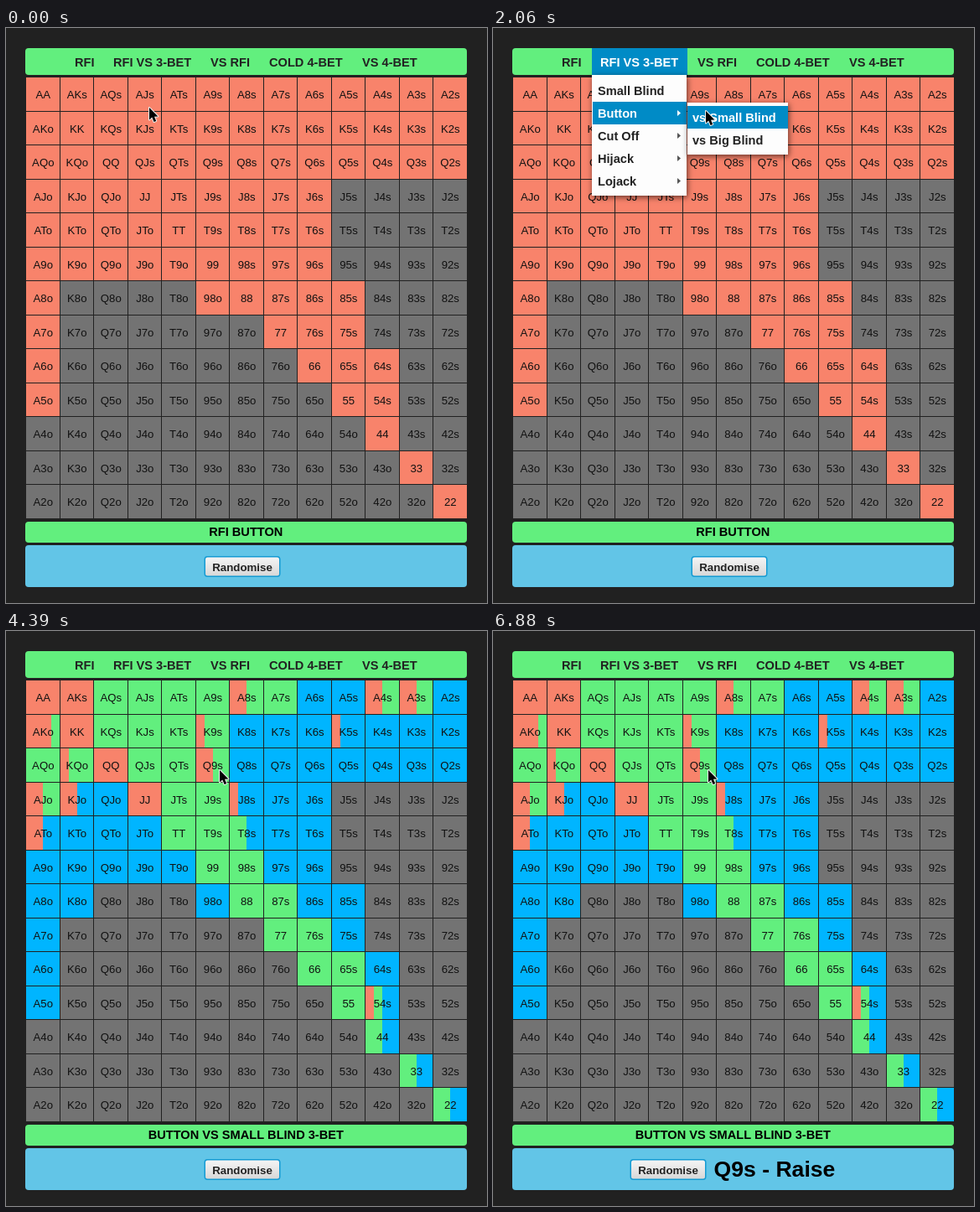
These frames come from a looping animation (574x686 px, 6.91 s). An HTML page with a canvas:

```html
<!DOCTYPE html>
<html lang="en">
<head>
<meta charset="utf-8">
<title>Range chart</title>
<style>
html, body { margin: 0; width: 100%; height: 100%; overflow: hidden; background: #212121; }
canvas { display: block; }
</style>
</head>
<body>
<canvas id="stage" width="574" height="686"></canvas>
<script>
const ctx = document.getElementById('stage').getContext('2d');
const LOOP = 6910, CHART_SWITCH = 2850, RESULT = 5100;
const GREEN = '#62ef7e', ACTIVE = '#008bc6', INK = '#222';
const FONT = '"Liberation Sans", Arial, sans-serif';
const RANKS = 'AKQJT98765432';
const COLORS = { R: '#f8836b', G: GREEN, B: '#00b5ff', '.': '#737373' };

// Lower-case letters stand for cells split into quarters.
const MIXES = { a: 'RRGG', b: 'RRRG', c: 'RGGG', d: 'RBBB', e: 'RRBB', f: 'GGBB', g: 'RGBB' };
const CHART = [
  'RRGGGGaGBBaaB',
  'bRGGGcBBBdBBB',
  'GcRGGaBBBBBBB',
  'aeBRGGdBB....',
  'eBBBGGfBB....',
  'BBBBBGGBB....',
  'BB...BGGBB...',
  'B......GGB...',
  'B.......GGB..',
  'B........Gg..',
  '..........f..',
  '...........f.',
  '............f'
];

const TABS = [['RFI', 82], ['RFI VS 3-BET', 128], ['VS RFI', 244], ['COLD 4-BET', 314], ['VS 4-BET', 425]];
const MENU = ['Small Blind', 'Button', 'Cut Off', 'Hijack', 'Lojack'];
const SUBMENU = ['vs Small Blind', 'vs Big Blind'];

// Pointer stops: time, x, y
const PATH = [
  [0, 171, 95], [250, 171, 95], [950, 191, 43], [1250, 191, 43], [1680, 200, 102],
  [2060, 254, 99], [2450, 287, 104], [3300, 287, 104], [4050, 255, 166],
  [6400, 255, 166], [6800, 257, 166], [LOOP, 257, 166]
];

function pointerAt(t) {
  const k = PATH.findIndex(p => p[0] > t);
  const [t0, x0, y0] = PATH[k - 1], [t1, x1, y1] = PATH[k];
  const u = (t - t0) / (t1 - t0), s = u * u * (3 - 2 * u);
  return [x0 + (x1 - x0) * s, y0 + (y1 - y0) * s];
}

function rect(x, y, w, h, color) {
  ctx.fillStyle = color;
  ctx.fillRect(x, y, w, h);
}

function panel(x, y, w, h, color, radius = 4) {
  ctx.fillStyle = color;
  ctx.beginPath();
  ctx.roundRect(x, y, w, h, radius);
  ctx.fill();
}

function text(str, x, y, color = INK, size = 14.6, align = 'left', weight = 'bold') {
  ctx.font = `${weight} ${size}px ${FONT}`;
  ctx.textAlign = align;
  ctx.fillStyle = color;
  ctx.fillText(str, x, y);
}

function popup(x, y, w, h) {
  ctx.save();
  ctx.shadowColor = 'rgba(0,0,0,.6)';
  ctx.shadowBlur = 7;
  ctx.shadowOffsetX = 1;
  ctx.shadowOffsetY = 2;
  rect(x, y, w, h, '#fdfdfd');
  ctx.restore();
}

function drawGrid(opening) {
  const edge = (start, n) => Math.round(start + 40.5 * n);
  for (let i = 0; i < 13; i++) for (let j = 0; j < 13; j++) {
    let code = CHART[i][j];
    const hand = i === j ? RANKS[i] + RANKS[i]
      : i < j ? RANKS[i] + RANKS[j] + 's' : RANKS[j] + RANKS[i] + 'o';
    if (opening) code = code === '.' || hand === 'K8o' ? '.' : 'R';
    const x = edge(24.3, j), y = edge(59.3, i);
    const w = edge(24.3, j + 1) - x - 1, h = edge(59.3, i + 1) - y - 1;
    const parts = MIXES[code] || code;
    [...parts].forEach((c, k) => {
      const left = Math.round(w * k / parts.length);
      rect(x + left, y, w - left, h, COLORS[c]);
    });
    text(hand, 44.3 + 40.5 * j, 84 + 40.5 * i, '#111', 13.2, 'center', 'normal');
  }
}

function drawMenu(px, py) {
  rect(118, 24, 114, 32, ACTIVE);
  text(TABS[1][0], TABS[1][1], 46, '#fff');
  popup(118, 56, 113, 144);
  const hover = Math.floor((py - 61) / 27);
  MENU.forEach((item, i) => {
    const y = 61 + 27 * i, on = i === hover;
    if (on) rect(119, y, 112, 27, ACTIVE);
    text(item, 125, y + 19, on ? '#fff' : INK);
    if (!i) return;
    ctx.fillStyle = on ? '#fff' : '#555';
    ctx.beginPath();
    ctx.moveTo(220, y + 10);
    ctx.lineTo(224, y + 13.5);
    ctx.lineTo(220, y + 17);
    ctx.fill();
  });
  if (hover !== 1) return;
  popup(232, 89, 120, 62);
  SUBMENU.forEach((item, i) => {
    const on = i === 0 && px >= 232;
    if (on) rect(232, 93, 120, 27, ACTIVE);
    text(item, 238, 112 + 27 * i, on ? '#fff' : INK);
  });
}

function drawButton(x) {
  const shade = ctx.createLinearGradient(0, 630, 0, 655);
  shade.addColorStop(0, '#f6f6f6');
  shade.addColorStop(1, '#d6d6d6');
  panel(x, 630, 91, 25, '#149bd3', 4);
  panel(x + 1.5, 631.5, 88, 22, shade, 2.5);
  text('Randomise', x + 45.5, 647.5, INK, 13.3, 'center');
}

function drawPointer(x, y) {
  ctx.save();
  ctx.translate(x, y);
  ctx.beginPath();
  [[0, 0], [0, 14.5], [3.3, 11.6], [5.6, 17], [8.2, 15.9], [6, 10.7], [10.4, 10.4]]
    .forEach(p => ctx.lineTo(...p));
  ctx.closePath();
  ctx.lineJoin = 'round';
  ctx.strokeStyle = '#eee';
  ctx.lineWidth = 2;
  ctx.stroke();
  ctx.fillStyle = '#000';
  ctx.fill();
  ctx.restore();
}

function draw(now) {
  const t = now % LOOP, [px, py] = pointerAt(t);
  const opening = t < CHART_SWITCH;
  rect(0, 0, 574, 686, '#212121');
  panel(23, 24, 527, 32, GREEN);
  TABS.forEach(([name, x]) => text(name, x, 46));
  drawGrid(opening);
  panel(23, 589, 527, 25, GREEN);
  text(opening ? 'RFI BUTTON' : 'BUTTON VS SMALL BLIND 3-BET', 286.3, 606, '#000', 14.6, 'center');
  panel(23, 617, 527, 50, '#62c5e7');
  const done = t >= RESULT;
  drawButton(done ? 163.5 : 236.5);
  if (done) text('Q9s - Raise', 263.5, 651, '#000', 26.6);
  // The menu opens once the pointer reaches the tab bar.
  if (opening && (t > 950 || py < 56)) drawMenu(px, py);
  drawPointer(px, py);
}

const start = performance.now();
function tick() {
  draw(performance.now() - start);
  requestAnimationFrame(tick);
}
tick();
</script>
</body>
</html>
```
